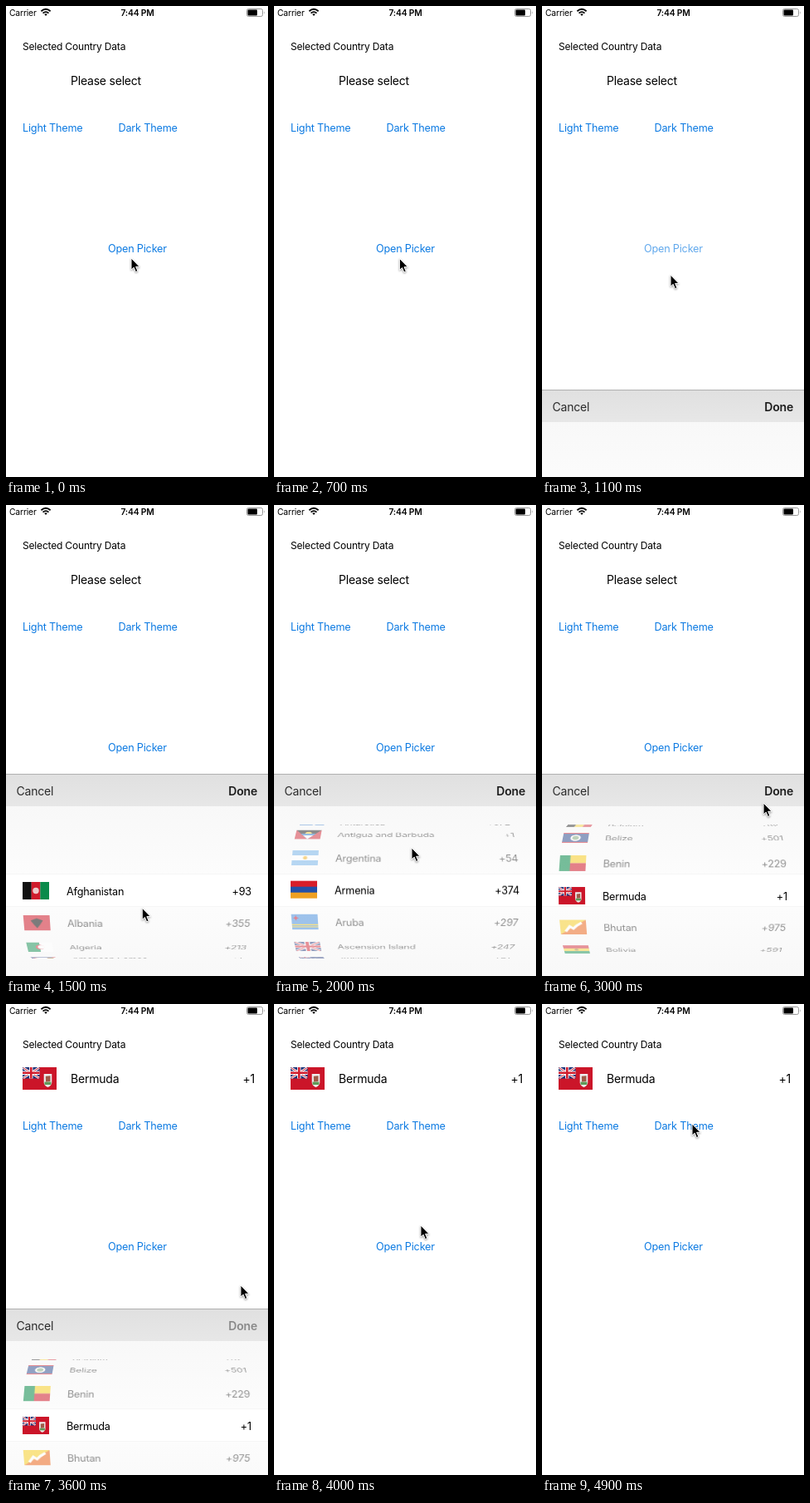
These frames come from a looping animation (316x566 px, 5 s). An HTML page:

```html
<!DOCTYPE html>
<html lang="en">
<head>
<meta charset="utf-8">
<title>Country picker</title>
<style>
  html, body { margin: 0; width: 100%; height: 100%; overflow: hidden; background: #fff; }
  * { letter-spacing: -.015em; }
  #stage { position: relative; width: 316px; height: 566px; overflow: hidden; font-family: Inter, sans-serif; color: #000; }
  #stage div, #stage svg { position: absolute; }
  .label { height: 20px; line-height: 20px; white-space: nowrap; }
  .link { font-size: 12.65px; color: #0c7ae2; }
  .value { font-size: 14px; }
  .status { font-size: 10.3px; }
  #panel { left: 0; top: 0; width: 316px; height: 243px; background: linear-gradient(#f8f8f8 39px, #fcfcfc 120px, #fcfcfc 160px, #f8f8f8); }
  #bar { width: 316px; height: 38px; border-top: 1px solid #b0b0b0; background: linear-gradient(#e0e0e0, #e7e7e7); }
  #band { top: 121px; width: 316px; height: 38px; background: #fff; box-shadow: 0 0 0 1px #f6f6f6; }
  #wheel { top: 61px; width: 316px; height: 161px; overflow: hidden; perspective: 780px; }
  .row { top: 61px; width: 316px; height: 39px; line-height: 39px; font-size: 12.65px; white-space: nowrap; }
  .row svg { left: 20px; top: 8px; }
  .row div { left: 73px; }
  .row div + div { left: auto; right: 20px; }
  .off div { opacity: .78; }
</style>
</head>
<body>
<div id="stage">
  <div class="label status" style="left:4px;top:-2px">Carrier</div>
  <div class="label status" style="left:0;width:317px;top:-2px;text-align:center;font-weight:600">7:44 PM</div>
  <svg width="316" height="16">
    <g fill="none" stroke="#000" stroke-width="1.8">
      <path d="M42.4 6.2Q48 1.4 53.6 6.2M44.5 8.6Q48 5.6 51.5 8.6"/>
      <path d="M46.2 9.8Q48 8.5 49.8 9.8L48 12Z" fill="#000" stroke="none"/>
    </g>
    <rect x="290.5" y="3.5" width="19" height="9" rx="2" fill="none" stroke="#999"/>
    <rect x="291.5" y="4.5" width="11.5" height="7" rx="1"/>
    <path d="M311 6.3q1.6 1.7 0 3.4z" fill="#999"/>
  </svg>
  <div class="label" style="left:20px;top:39px;font-size:12px">Selected Country Data</div>
  <div id="flag" style="left:20px;top:76px"></div>
  <div id="name" class="label value" style="left:78px;top:80px"></div>
  <div id="code" class="label value" style="right:16px;top:80px"></div>
  <div class="label link" style="left:20px;top:137px">Light Theme</div>
  <div class="label link" style="left:135.5px;top:137px">Dark Theme</div>
  <div id="open" class="label link" style="left:123px;top:282px">Open Picker</div>
  <div id="panel">
    <div id="bar"></div>
    <div class="label value" style="left:12.5px;top:11px;color:#2b2b2b">Cancel</div>
    <div id="done" class="label value" style="right:13px;top:11px;font-weight:600;color:#1c1c1c">Done</div>
    <div id="band"></div>
    <div id="wheel"></div>
  </div>
  <svg id="cursor" width="18" height="24" viewBox="-2 -2 18 24" style="left:-2px;top:-2px;filter:drop-shadow(0 1px 1px #0006)">
    <path d="M0 0V14L3.2 11.2 5.4 16.6 7.9 15.5 5.6 10.3H10Z" stroke="#fff" stroke-width="1"/>
  </svg>
</div>
<script>
const $ = id => document.getElementById(id);

// Flag parts, drawn in a 30 x 20 box
const rect = (x, y, w, h, c) => `<rect x="${x}" y="${y}" width="${w}" height="${h}" fill="${c}"/>`;
const disc = (x, y, r, c) => `<circle cx="${x}" cy="${y}" r="${r}" fill="${c}"/>`;
const poly = (points, c) => `<polygon points="${points}" fill="${c}"/>`;
const rows = (...cs) => cs.map((c, i) => rect(0, i * 20 / cs.length, 30, 20 / cs.length + .1, c)).join('');
const cols = (...cs) => cs.map((c, i) => rect(i * 30 / cs.length, 0, 30 / cs.length + .1, 20, c)).join('');
const RED = '#d01c2c', BLUE = '#20489f', NAVY = '#1c3378', GREEN = '#0a8a4a', GOLD = '#f7cf2a', SKY = '#7cb8ea', WHITE = '#fff', BLACK = '#111';
const line = (d, c, w) => `<path d="${d}" stroke="${c}" stroke-width="${w}" fill="none"/>`;
const jack = (scale = .5) => `<g transform="scale(${scale})">` + rect(0, 0, 30, 20, NAVY) +
  line('M1 1L29 19M29 1L1 19', WHITE, 4) + line('M1 1L29 19M29 1L1 19', RED, 1.4) +
  line('M15 0V20M0 10H30', WHITE, 6.4) + line('M15 0V20M0 10H30', RED, 3.8) + '</g>';
const badge = '<path d="M18.8 6h7v7.5q0 2.8-3.5 4.3-3.5-1.5-3.5-4.3z" fill="#eee"/>';
const flagSvg = (art, w, h) => `<svg width="${w}" height="${h}" viewBox="0 0 30 20" preserveAspectRatio="none">${art}</svg>`;

const countries = [
  ['Afghanistan', 93, cols(BLACK, RED, GREEN) + disc(15, 10, 3.5, '#eecccc')],
  ['Albania', 355, rows(RED) + poly('15,4 22,7 18,13 15,17 12,13 8,7', BLACK)],
  ['Algeria', 213, cols(GREEN, WHITE) + disc(15, 10, 5, RED) + disc(16.5, 10, 4, WHITE)],
  ['American Samoa', 1, rows(NAVY) + poly('0,10 30,-1 30,21', RED) + poly('2,10 30,1 30,19', WHITE) + disc(23, 10, 4, '#94601f')],
  ['Andorra', 376, cols(BLUE, GOLD, RED) + disc(15, 10, 3, '#c08030')],
  ['Angola', 244, rows(RED, BLACK) + disc(15, 10, 4, GOLD) + disc(16, 9, 3, RED)],
  ['Anguilla', 1, rows(NAVY) + jack() + badge + disc(22.3, 11, 2, '#f09030')],
  ['Antarctica', 672, rows('#3a7dce') + poly('8,6 14,4 22,6 23,12 17,16 14,12 9,11', WHITE)],
  ['Antigua and Barbuda', 1, rows(RED) + poly('0,0 30,0 15,20', BLACK) + disc(15, 8, 4, GOLD) + poly('6,8 24,8 15,20', '#2878c8') + poly('9,12 21,12 15,20', WHITE)],
  ['Argentina', 54, rows(SKY, WHITE, SKY) + disc(15, 10, 2.4, '#f2b630')],
  ['Armenia', 374, rows('#d81e2a', '#2350a8', '#efa022')],
  ['Aruba', 297, rows('#4f93df') + rect(0, 13, 30, 1.3, GOLD) + rect(0, 15.6, 30, 1.3, GOLD) + poly('5,1.5 6,4 8.5,5 6,6 5,8.5 4,6 1.5,5 4,4', RED)],
  ['Ascension Island', 247, jack(1)],
  ['Australia', 61, rows(NAVY) + jack() + disc(7.5, 15, 2, WHITE) + disc(22, 4, 1, WHITE) + disc(19, 9, 1, WHITE) + disc(26, 8, 1, WHITE) + disc(22, 16, 1, WHITE)],
  ['Austria', 43, rows(RED, WHITE, RED)],
  ['Azerbaijan', 994, rows('#2aa5d8', RED, GREEN) + disc(14.5, 10, 2.7, WHITE) + disc(15.3, 10, 2.2, RED)],
  ['Bahamas', 1, rows('#1a9ab0', GOLD, '#1a9ab0') + poly('0,0 14,10 0,20', BLACK)],
  ['Bahrain', 973, rows(RED) + poly('0,0 8,0 12,2 8,4 12,6 8,8 12,10 8,12 12,14 8,16 12,18 8,20 0,20', WHITE)],
  ['Bangladesh', 880, rows('#0a6a4e') + disc(13.5, 10, 6, RED)],
  ['Barbados', 1, cols(BLUE, GOLD, BLUE) + line('M12 6V10H18V6M15 5V15', BLACK, 1.2)],
  ['Belarus', 375, rows(RED, RED, GREEN) + rect(0, 0, 3.5, 20, WHITE) + rect(1, 0, 1.5, 20, RED)],
  ['Belgium', 32, cols(BLACK, GOLD, RED)],
  ['Belize', 501, rows('#1f4088') + rect(0, 0, 30, 2, RED) + rect(0, 18, 30, 2, RED) + disc(15, 10, 6, WHITE) + disc(15, 10, 3.8, '#7fa87c')],
  ['Benin', 229, rows(GOLD, RED) + rect(0, 0, 12, 20, GREEN)],
  ['Bermuda', 1, rows('#cb1529') + jack() + badge + rect(19.4, 13, 5.8, 2.6, '#5f9a58') + poly('20.3,8 24.5,7.5 24.5,12.5 20.5,13', '#a05a48')],
  ['Bhutan', 975, rows('#ec6a20') + poly('0,0 30,0 0,20', GOLD) + line('M6 16L11 9 15 12 19 8 25 4', WHITE, 3.2)],
  ['Bolivia', 591, rows(RED, GOLD, GREEN) + disc(15, 10, 2.4, '#a07a30')],
  ['Bosnia and Herzegovina', 387, rows(BLUE) + poly('8,0 25,0 25,20', GOLD)],
  ['Botswana', 267, rows(SKY) + rect(0, 7, 30, 6, WHITE) + rect(0, 8, 30, 4, BLACK)]
];
const chosen = countries[24];

const rowDivs = countries.map(([name, code, art]) => {
  const row = document.createElement('div');
  row.innerHTML = flagSvg(art, 32, 21) + `<div>${name}</div><div>+${code}</div>`;
  $('wheel').append(row);
  return row;
});
$('flag').innerHTML = flagSvg(chosen[2], 41, 27);

// Smooth interpolation through [time, ...values] keys, without overshoot
function sample(keys, t, k = 1) {
  const last = keys.length - 1;
  if (t <= keys[0][0]) return keys[0][k];
  if (t >= keys[last][0]) return keys[last][k];
  const i = keys.findIndex(key => key[0] > t) - 1;
  const slope = j => j < 0 || j >= last ? 0 : (keys[j + 1][k] - keys[j][k]) / (keys[j + 1][0] - keys[j][0]);
  const tangent = j => {
    const a = slope(j - 1), b = slope(j);
    return a * b > 0 ? 2 * a * b / (a + b) : 0;
  };
  const h = keys[i + 1][0] - keys[i][0], u = (t - keys[i][0]) / h, v = 1 - u;
  return v * v * (1 + 2 * u) * keys[i][k] + u * u * (3 - 2 * u) * keys[i + 1][k] +
    h * u * v * (v * tangent(i) - u * tangent(i + 1));
}

const pointer = [
  [400, 151, 303], [900, 152, 304], [1100, 155, 323], [1600, 165, 500], [1720, 165, 500],
  [2000, 166, 412], [2300, 177, 398], [2600, 215, 378], [3000, 267, 358], [3400, 284, 340],
  [3600, 283, 338], [4000, 177, 266], [4180, 172, 289], [4600, 175, 170], [4900, 181, 144]
];
const scroll = [[1650, 0], [1800, 2], [2000, 10], [2250, 17], [2600, 22.3], [3000, 23.85], [3200, 24]];

const clamp = x => Math.min(1, Math.max(0, x));
const easeOut = x => 1 - (1 - clamp(x)) ** 2.2;
const STEP = 25.8, RADIUS = 89.6;

function draw(t) {
  const picked = t >= 3540;
  $('flag').style.display = picked ? '' : 'none';
  $('name').textContent = picked ? chosen[0] : 'Please select';
  $('code').textContent = picked ? '+' + chosen[1] : '';

  $('open').style.opacity = t < 850 ? 1 : .2 + .8 * clamp((t - 900) / 360);
  $('done').style.opacity = t < 3480 ? 1 : .45;

  const shown = easeOut((t - 988) / 500) - easeOut((t - 3565) / 420);
  $('panel').style.transform = `translateY(${Math.round(566 - 243 * shown)}px)`;

  const offset = sample(scroll, t);
  rowDivs.forEach((row, i) => {
    const d = i - offset, far = Math.abs(d);
    row.className = far > .5 ? 'row off' : 'row';
    row.style.display = far < 3.45 ? '' : 'none';
    row.style.opacity = far > .5 ? .62 - .07 * far : 1;
    row.style.transform = `translateZ(${-RADIUS}px) rotateX(${-d * STEP}deg) translateZ(${RADIUS}px)`;
  });

  $('cursor').style.transform = `translate(${sample(pointer, t, 1)}px, ${sample(pointer, t, 2)}px)`;
}

const start = performance.now();
function tick() {
  draw((performance.now() - start) % 5000);
  requestAnimationFrame(tick);
}
tick();
</script>
</body>
</html>
```
